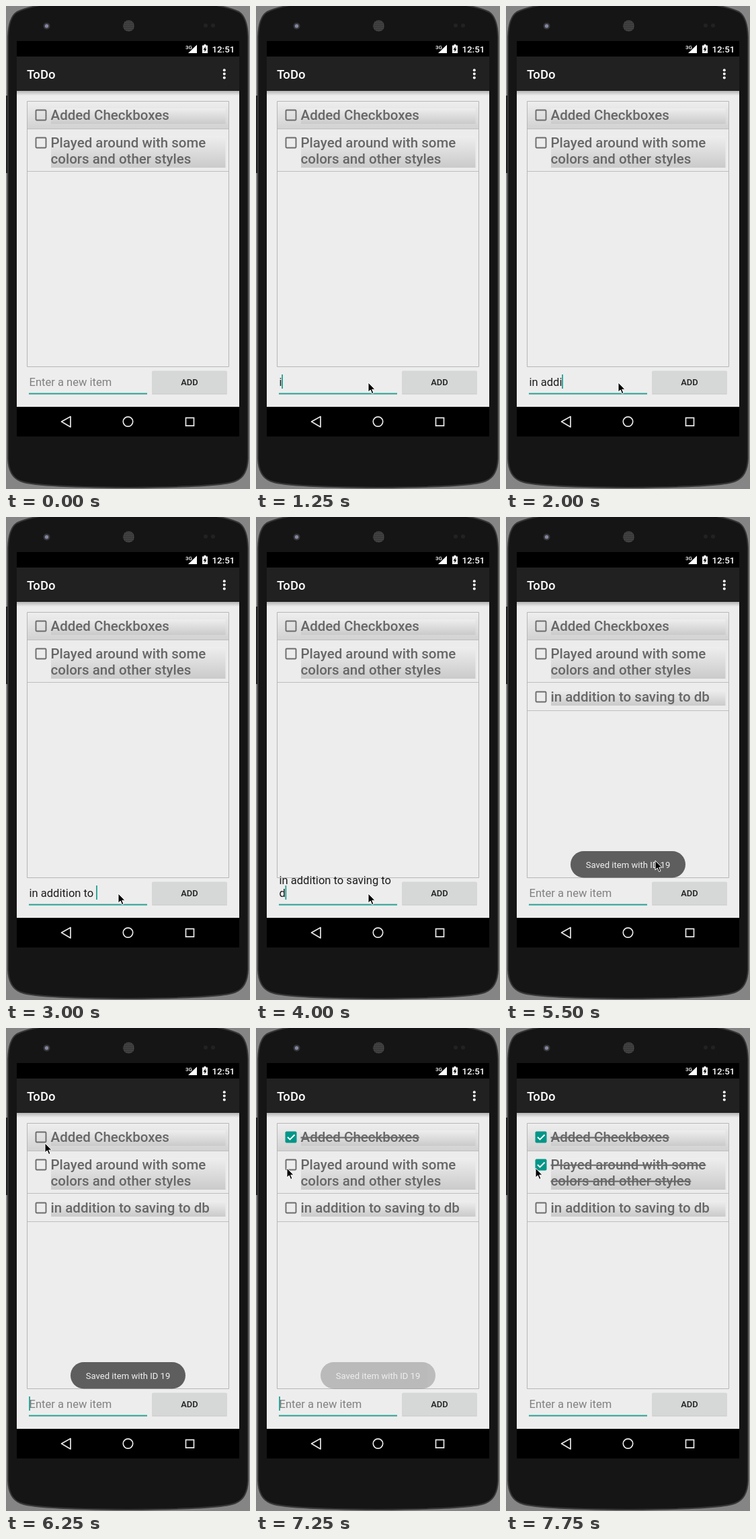
An HTML page that plays this animation: 363 px wide and 717 px high, repeating every 8 s.

```html
<!DOCTYPE html>
<html lang="en">
<head>
<meta charset="utf-8">
<title>ToDo</title>
<style>
  html, body { margin: 0; width: 100%; height: 100%; overflow: hidden; background: #858585; }
  svg { display: block; width: 363px; height: 717px; font-family: Roboto, sans-serif; }
  text { white-space: pre; }
  .medium { font-weight: 500; }
  .row text { font-size: 20.5px; font-weight: 500; fill: #676767; }
  .done text { text-decoration: line-through; }
  .row .on, .done .off { display: none; }
  .done .on { display: inline; }
  .entry { font-size: 16.56px; fill: #1c1c1c; }
</style>
</head>
<body>
<svg viewBox="0 0 363 717">
  <defs>
    <linearGradient id="rowFill" x2="0" y2="1">
      <stop stop-color="#eee"/><stop offset="1" stop-color="#d2d2d2"/>
    </linearGradient>
    <linearGradient id="textFill" x2="0" y2="1">
      <stop stop-color="#eee"/><stop offset="1" stop-color="#cacaca"/>
    </linearGradient>
    <linearGradient id="shadow" x2="0" y2="1">
      <stop stop-color="#b4b4b4"/><stop offset="1" stop-color="#ededed"/>
    </linearGradient>
    <pattern id="mesh" width="3" height="3" patternUnits="userSpaceOnUse">
      <rect width="3" height="3" fill="#484848"/><circle cx="1.5" cy="1.5" r=".9" fill="#242424"/>
    </pattern>
    <clipPath id="entryClip"><path d="M33 533h178v44H33z"/></clipPath>
  </defs>

  <!-- phone -->
  <path d="M0 133h4v115H0z" fill="#222"/>
  <path d="M3 46Q4 17 16 9Q30 2 56 -2H307Q333 2 347 9Q359 17 360 46V672Q359 698 342 705Q324 714 182 715Q39 714 21 705Q4 698 3 672Z" fill="#151515" stroke="#373737" stroke-width="2"/>
  <circle cx="60.500" cy="29.700" r="5" fill="#363638"/>
  <circle cx="60.500" cy="29.700" r="2.700" fill="#8286a0"/>
  <circle cx="182.500" cy="29.500" r="8.500" fill="url(#mesh)"/>
  <g fill="#222"><circle cx="297" cy="29" r="3"/><circle cx="308" cy="29" r="3"/></g>

  <!-- screen -->
  <path d="M16 52h331v587H16z"/>
  <path d="M16 75h331v51H16z" fill="#212121"/>
  <path d="M16 126h331v469H16z" fill="#ededed"/>
  <path d="M16 126h331v7H16z" fill="url(#shadow)"/>
  <g fill="#fff">
    <text x="267" y="64" font-size="8" class="medium">3G</text>
    <path d="M284 57.500v12.500h-13z"/>
    <path d="M292 58.500h2.500V57h3v1.500h2.500V70h-8z"/>
    <path d="M297 60l-3.500 5h2v3.500l3-5h-2z" fill="#000"/>
    <text x="306.500" y="69" font-size="13.300" class="medium">12:51</text>
    <text x="31" y="108" font-size="18.500" class="medium">ToDo</text>
    <circle cx="324.800" cy="95.200" r="2"/><circle cx="324.800" cy="100.800" r="2"/><circle cx="324.800" cy="106.400" r="2"/>
  </g>
  <g fill="none" stroke="#e8e8e8" stroke-width="1.700">
    <path d="M82.500 617L96 609.500V625Z" stroke-linejoin="round"/>
    <circle cx="181.500" cy="617" r="7.200"/>
    <path d="M267.500 611.300h12v11.800h-12z"/>
  </g>

  <g id="list"></g>
  <path d="M31.500 141.500h300v394h-300z" fill="none" stroke="#b7b7b7"/>

  <!-- entry and button -->
  <g class="entry" clip-path="url(#entryClip)">
    <text id="hint" x="34.500" y="564" fill="#808080">Enter a new item</text>
    <text id="upper" x="34.500" y="544.600"></text>
    <text id="lower" x="34.500" y="564"></text>
    <rect id="caret" y="547" width="1.700" height="21" fill="#169c90"/>
  </g>
  <path d="M34 575.500h176" stroke="#2ba094" stroke-width="1.800"/>
  <rect x="217" y="575" width="112" height="1.500" rx=".7" fill="#cacaca"/>
  <rect id="button" x="217" y="541.500" width="112" height="34" rx="2"/>
  <text x="273" y="563" font-size="12.900" text-anchor="middle" class="medium" fill="#1d1d1d">ADD</text>

  <g id="toast">
    <rect x="96" y="496" width="171" height="39.500" rx="19.700" fill="#5e5e5e"/>
    <text x="181.500" y="521" font-size="13.100" text-anchor="middle" fill="#f0f0f0">Saved item with ID 19</text>
  </g>
  <path id="pointer" d="M0 0V14L3.300 11L5.600 16.500L8 15.500L5.700 10.200H10Z" stroke="#fff"/>
</svg>
<script>
const STEP = 250, LOOP = 8000;
const $ = id => document.getElementById(id);
const typed = 'in addition to saving to db', wrapAt = 24;

// Top and bottom edge, first baseline, lines of text
const items = [
  { top: 142, bottom: 182, base: 169, lines: ['Added Checkboxes'], fill: 'url(#rowFill)' },
  { top: 183, bottom: 245, base: 210, lines: ['Played around with some', 'colors and other styles'], fill: '#ececec' },
  { top: 246, bottom: 287, base: 274, lines: [typed], fill: '#ececec' },
];

function rowMarkup({ top, bottom, base, lines, fill }) {
  const boxY = base - 15;
  const height = lines.length * 24 - 1;
  const text = lines.map((line, i) => `<text x="66.5" y="${base + i * 24}">${line}</text>`).join('');
  return `<g class="row">
    <rect x="32" y="${top}" width="299" height="${bottom - top}" fill="${fill}"/>
    <path d="M32 ${bottom + .5}h299" stroke="#bebebe"/>
    <circle class="ripple" cx="52" cy="${boxY + 8}" r="20" opacity="0"/>
    <rect x="67" y="${base - 17}" width="259.500" height="${height}" fill="url(#textFill)"/>
    <rect class="off" x="44.500" y="${boxY + .5}" width="15" height="15" rx="1.200" fill="none" stroke="#6c6c6c" stroke-width="1.900"/>
    <g class="on">
      <rect x="43.500" y="${boxY - .5}" width="17" height="17" rx="2" fill="#009688"/>
      <path d="M47 ${boxY + 8}l3.500 3.500l7 -7" fill="none" stroke="#fff" stroke-width="1.900"/>
    </g>${text}</g>`;
}
$('list').innerHTML = items.map(rowMarkup).join('');
const rows = [...document.querySelectorAll('.row')];

// [time, x, y]
const pointerPath = [
  [250, 200, 372], [500, 178, 470], [750, 167, 559], [4250, 167, 559], [4500, 241, 562],
  [5250, 241, 562], [5500, 222, 510], [5750, 150, 340], [6000, 84, 212], [6250, 58, 171],
  [6500, 50, 165], [6750, 50, 165], [7250, 46, 208], [7500, 45, 210], [7750, 44, 208],
];
const typing = [[1000, 0], [1250, 1], [3000, 15], [3750, 24], [4000, 26], [4250, 27]];
const toastFade = [[4750, 0], [5000, .2], [5250, 1], [6750, 1], [7000, .85], [7250, .35], [7500, 0]];

function sample(keys, t, column = 1) {
  if (t <= keys[0][0]) return keys[0][column];
  const i = keys.findIndex(key => key[0] >= t);
  if (i < 0) return keys[keys.length - 1][column];
  const a = keys[i - 1], b = keys[i];
  return a[column] + (b[column] - a[column]) * (t - a[0]) / (b[0] - a[0]);
}

const show = (node, visible) => { node.style.display = visible ? '' : 'none'; };

function render(t) {
  const saved = t >= 5000;
  const text = saved ? '' : typed.slice(0, Math.round(sample(typing, t)));
  const wrapped = text.length > wrapAt;
  $('upper').textContent = wrapped ? text.slice(0, wrapAt) : '';
  $('lower').textContent = wrapped ? text.slice(wrapAt + 1) : text;
  show($('hint'), !text);
  show($('caret'), saved ? (t - 5000) % 1000 < 500 : t >= 1000);
  $('caret').setAttribute('x', 34.2 + (text ? $('lower').getComputedTextLength() : 0));

  $('button').setAttribute('fill', t === 4750 || t === 5000 ? '#bababa' : '#d6d7d7');
  $('toast').setAttribute('opacity', sample(toastFade, t));
  show(rows[2], saved);
  [6750, 7500].forEach((checkedAt, i) => {
    rows[i].classList.toggle('done', t >= checkedAt);
    rows[i].querySelector('.ripple').setAttribute('opacity', t === checkedAt ? .1 : 0);
  });

  show($('pointer'), t >= 250);
  $('pointer').setAttribute('transform', `translate(${sample(pointerPath, t)} ${sample(pointerPath, t, 2)})`);
}

function tick() {
  render(Math.floor(performance.now() % LOOP / STEP) * STEP);
  requestAnimationFrame(tick);
}
tick();
</script>
</body>
</html>
```
